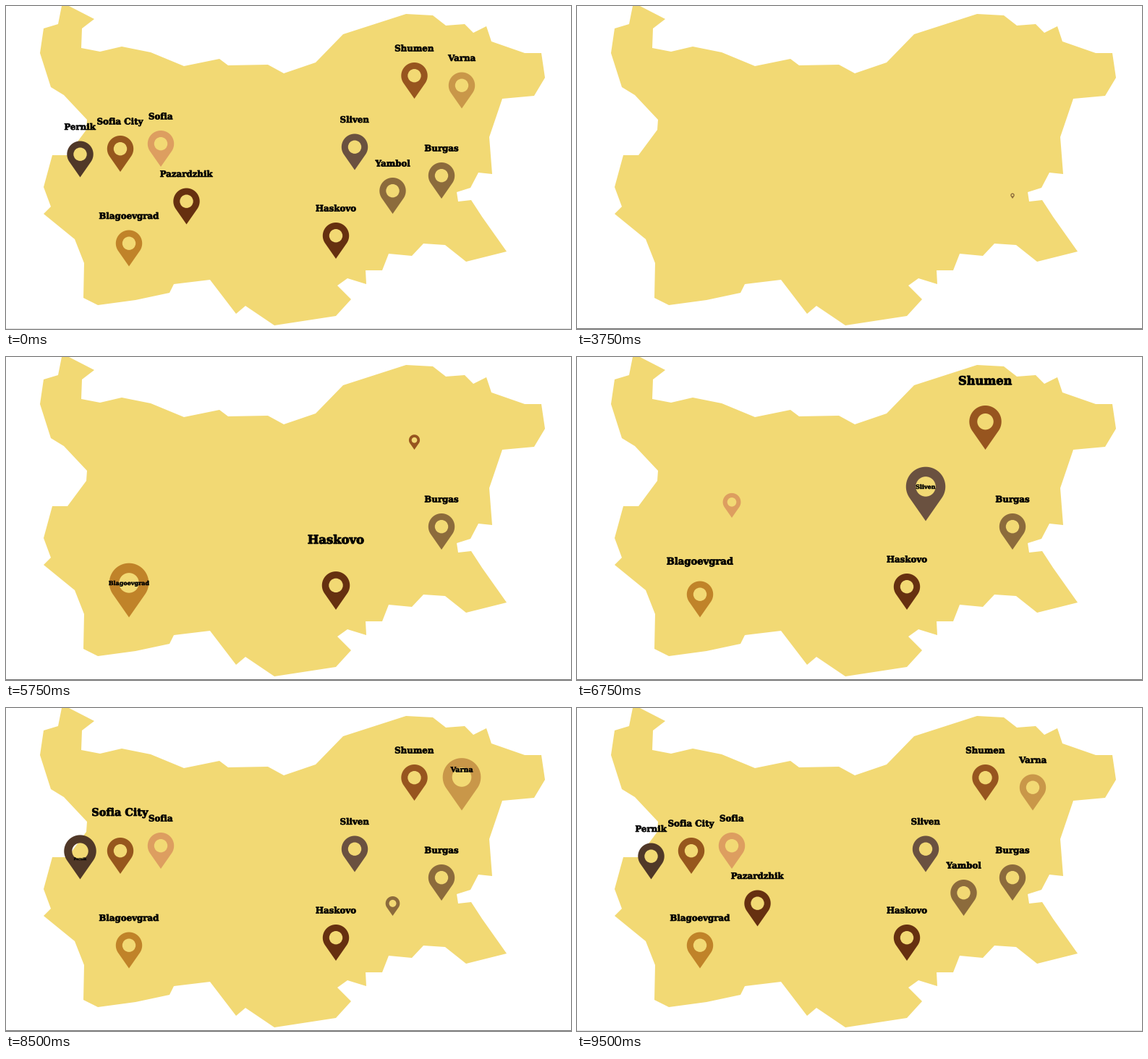
These frames come from a looping animation (781x446 px, 10000 ms). A matplotlib script:

```python
import matplotlib.pyplot as plt
import numpy as np
from matplotlib.animation import FuncAnimation
from matplotlib.patches import PathPatch, Polygon, Rectangle
from matplotlib.path import Path
from matplotlib.textpath import TextPath
from matplotlib.transforms import Affine2D

W, H, DPI = 781, 446, 100
STEP, LOOP = 250, 10000              # ms
INTRO_START, INTRO_END = 3750, 9500  # ms
POP = 1540                           # length of one pop, ms
PEAK_AT, PEAK = 0.55, 1.5
LABEL_DELAY = 0.3 * POP
LABEL_SIZE, LABEL_RISE, LABEL_STROKE = 11.8, 65.6, 0.7

# Corners of the country, clockwise from the north-west
BORDER = [
    (77, 0), (87, 0), (122, 18), (105, 31), (104, 58), (130, 63), (160, 56),
    (200, 64), (246, 83), (295, 73), (307, 82), (362, 81), (384, 93),
    (428, 78), (466, 39), (553, 11), (590, 13), (608, 27), (634, 25),
    (646, 37), (664, 28), (671, 49), (717, 65), (740, 65), (745, 99),
    (730, 124), (686, 128), (668, 181), (672, 232), (653, 230), (642, 251),
    (623, 257), (625, 270), (643, 268), (658, 291), (692, 339), (636, 353),
    (607, 330), (577, 328), (561, 345), (529, 342), (520, 365), (497, 365),
    (498, 384), (472, 376), (458, 386), (477, 405), (456, 428), (371, 441),
    (331, 414), (318, 425), (282, 378), (232, 384), (226, 396), (179, 406),
    (127, 413), (107, 403), (108, 355), (95, 322), (52, 287), (62, 277),
    (52, 250), (64, 206), (85, 206), (111, 171), (112, 157), (80, 123),
    (62, 112), (47, 65), (52, 31), (72, 25)]

# name, tip x, tip y, colour, pop start (ms)
PLACES = [
    ("Burgas", 602, 266, "#8c6b3c", 3665),
    ("Haskovo", 456, 349, "#663010", 4290),
    ("Blagoevgrad", 170, 359.5, "#c08329", 4905),
    ("Shumen", 564.5, 128, "#97551f", 5515),
    ("Sliven", 482, 226.5, "#6a5140", 5905),
    ("Sofia", 214, 222, "#dd9e60", 6365),
    ("Sofia City", 158, 229, "#96571d", 6805),
    ("Varna", 630, 141.5, "#c99749", 7580),
    ("Pernik", 102.5, 236.5, "#503828", 7810),
    ("Yambol", 534.5, 287, "#8c6b3c", 8195),
    ("Pazardzhik", 249.5, 301.5, "#663010", 8590),
]


def pin_path(radius=18.2, height=50, hole=9.2):
    """Round head with straight tangents to a tip at the origin, y down."""
    centre = radius - height
    lean = np.arcsin(radius / -centre)
    angles = np.linspace(lean, -np.pi - lean, 60)
    head = np.column_stack([radius * np.cos(angles),
                            centre + radius * np.sin(angles)])
    body = Path(np.vstack([(0, 0), head, (0, 0)]), closed=True)
    return Path.make_compound_path(body, Path.circle((0, centre), hole))


def label_path(text):
    """Centred text, raised above the tip, y down."""
    path = TextPath((0, 0), text, size=LABEL_SIZE,
                    prop={"family": "DejaVu Serif", "weight": "bold"})
    box = path.get_extents()
    shift = Affine2D().translate(-(box.x0 + box.x1) / 2, 0).scale(1, -1)
    return shift.translate(0, -LABEL_RISE).transform_path(path)


def pop_scale(elapsed):
    """Grow past full size, then settle."""
    return np.interp(elapsed / POP, [0, PEAK_AT, 1], [0, PEAK, 1])


fig = plt.figure(figsize=(W / DPI, H / DPI), dpi=DPI, facecolor="white")
ax = fig.add_axes([0, 0, 1, 1])
ax.set_xlim(0, W)
ax.set_ylim(H, 0)
ax.axis("off")

ax.add_patch(Polygon(BORDER, fc="#f2d974", lw=0))
rule = ax.add_patch(Rectangle((0, H - 1), W, 1, lw=0))

PIN = pin_path()
pins, labels = [], []
for name, _, _, color, _ in PLACES:
    pins.append(ax.add_patch(PathPatch(PIN, fc=color, lw=0, zorder=2)))
    labels.append(ax.add_patch(PathPatch(label_path(name), fc="black",
                                         ec="black", zorder=3)))


def place(patch, x, y, scale):
    patch.set_visible(scale > 0.01)
    if scale > 0.01:
        patch.set_transform(Affine2D().scale(scale).translate(x, y)
                            + ax.transData)


def draw(frame):
    now = frame * STEP
    intro = INTRO_START <= now < INTRO_END
    rule.set_facecolor("#6b6b6b" if intro else "#dcdcdc")
    for (_, x, y, _, start), pin, label in zip(PLACES, pins, labels):
        age = now - start if intro else LOOP
        label_scale = pop_scale(age - LABEL_DELAY)
        place(pin, x, y, pop_scale(age))
        place(label, x, y, label_scale)
        label.set_linewidth(LABEL_STROKE * label_scale * 72 / DPI)
    return [rule, *pins, *labels]


animation = FuncAnimation(fig, draw, frames=LOOP // STEP, interval=STEP,
                          repeat=True, repeat_delay=0)
plt.show()
```
